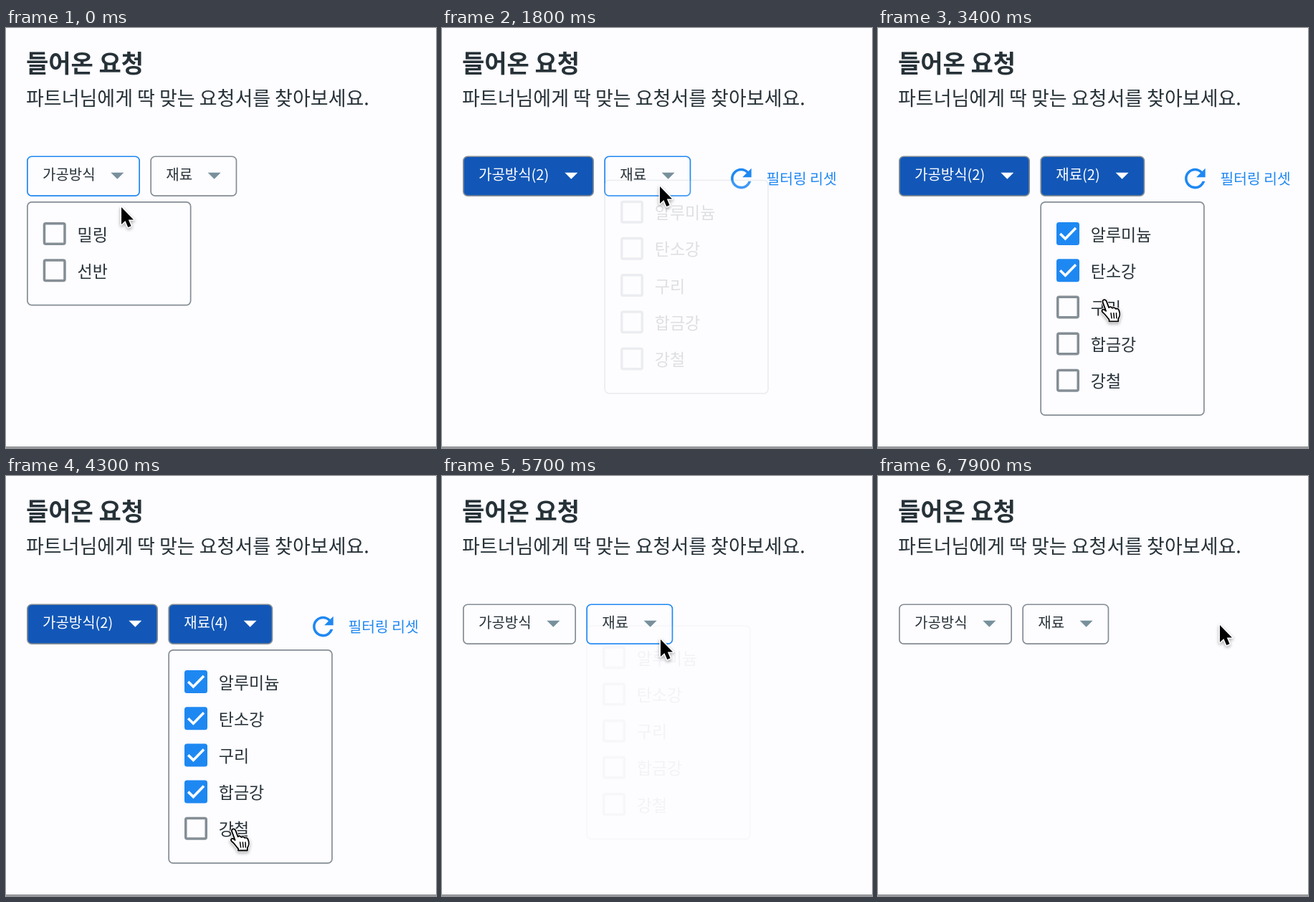
An HTML page with a canvas for the animation above (8 s loop, 600x586 px).

```html
<!DOCTYPE html>
<html lang="ko">
<head>
<meta charset="utf-8">
<title>들어온 요청</title>
<style>
  html, body { margin: 0; width: 100%; height: 100%; overflow: hidden; background: #fdfcff; }
  canvas { display: block; width: 600px; height: 586px; }
</style>
</head>
<body>
<canvas id="stage" lang="ko"></canvas>
<script>
const W = 600, H = 586, LOOP = 8000, STEP = 100;
const FONT = '"Noto Sans CJK KR", "Noto Sans CJK", sans-serif';
const BG = '#fdfcff', INK = '#263238', GREY = '#848e95', CARET = '#78909c';
const BLUE = '#1e88f2', NAVY = [18, 87, 183], PAPER = [253, 252, 255];

const canvas = document.getElementById('stage');
const ctx = canvas.getContext('2d');
const dpr = window.devicePixelRatio || 1;
canvas.width = W * dpr;
canvas.height = H * dpr;

const filters = [
  { label: '가공방식', width: 158, items: ['밀링', '선반'],
    clicks: [500, 1000], reset: 5000,
    open: [[-1000, 1430]] },
  { label: '재료', width: 121, items: ['알루미늄', '탄소강', '구리', '합금강', '강철'],
    clicks: [2740, 3150, 3600, 3980, 4420], reset: 5000,
    again: [6400], againReset: 6900,
    open: [[1728, 5000], [5660, 6900]] }
];

// time, x, y of the pointer tip
const path = [
  [0, 161, 250], [300, 108, 287], [600, 108, 287], [900, 110, 340], [1300, 113, 342],
  [1700, 304, 221], [1800, 304, 221], [2200, 312, 290], [2700, 315, 303], [2800, 315, 303],
  [3100, 316, 345], [3200, 316, 345], [3500, 318, 392], [3600, 318, 392],
  [3900, 319, 445], [4000, 319, 445], [4300, 319, 493], [4500, 319, 493],
  [4900, 488, 212], [5100, 488, 212], [5600, 305, 228], [5700, 305, 228],
  [6200, 290, 290], [6400, 290, 290], [6800, 473, 211], [6900, 473, 211],
  [7200, 477, 208], [8000, 477, 208]
];

const clamp = v => Math.max(0, Math.min(1, v));
const smooth = v => { v = clamp(v); return v * v * (3 - 2 * v); };
const mix = (a, b, p) => `rgb(${a.map((v, i) => Math.round(v + (b[i] - v) * p))})`;
const ramp = (t, from, to) => smooth((t - from) / 300) - smooth((t - to) / 300);

function pointerAt(t) {
  const i = path.findIndex(k => k[0] > t);
  const a = path[i - 1], b = path[i];
  const p = smooth((t - a[0]) / (b[0] - a[0]));
  return { x: a[1] + (b[1] - a[1]) * p, y: a[2] + (b[2] - a[2]) * p };
}

function countAt(f, t) {
  const hits = (list = [], end) => t < end ? list.filter(c => c <= t).length : 0;
  return hits(f.clicks, f.reset) + hits(f.again, f.againReset);
}

function fillAt(f, t) {
  return ramp(t, f.clicks[0], f.reset) + (f.again ? ramp(t, f.again[0], f.againReset) : 0);
}

const openAt = (f, t) => f.open.reduce((sum, [a, b]) => sum + ramp(t, a, b), 0);
const extra = n => n === 0 ? 0 : n === 1 ? 21 : 25;

function text(str, x, y, size, color, weight = 400) {
  ctx.font = `${weight} ${size}px ${FONT}`;
  ctx.fillStyle = color;
  ctx.fillText(str, x, y);
  return x + ctx.measureText(str).width;
}

function box(x, y, w, h, r, fill, stroke, line) {
  ctx.beginPath();
  ctx.roundRect(x + line / 2, y + line / 2, w - line, h - line, r);
  if (fill) { ctx.fillStyle = fill; ctx.fill(); }
  ctx.strokeStyle = stroke;
  ctx.lineWidth = line;
  ctx.stroke();
}

function drawButton(f, x, n, fill, hover) {
  const w = f.width + extra(n);
  const ink = mix([38, 50, 56], [255, 255, 255], fill);
  box(x, 178.4, w, 56.6, 6, mix(PAPER, NAVY, fill), hover && !n ? BLUE : GREY, 1.7);
  let end = text(f.label, x + 22, 212, 20, ink, 500);
  if (n) {
    const tight = n === 1 ? 2 : 0;
    end = text('(', end, 212, 20, ink, 500) - tight;
    end = text(n, end, 212, 20, ink, 500) - tight;
    text(')', end, 212, 20, ink, 500);
  }
  const c = x + w - 31.7;
  ctx.beginPath();
  ctx.moveTo(c - 9, 201.8);
  ctx.lineTo(c + 9, 201.8);
  ctx.lineTo(c, 210.8);
  ctx.fillStyle = n ? '#fff' : CARET;
  ctx.fill();
}

function drawCheck(x, y, on) {
  if (!on) return box(x, y, 32, 32, 2, null, GREY, 3.5);
  ctx.beginPath();
  ctx.roundRect(x, y, 32, 32, 3.5);
  ctx.fillStyle = BLUE;
  ctx.fill();
  ctx.beginPath();
  ctx.moveTo(x + 5.2, y + 16);
  ctx.lineTo(x + 12.4, y + 23);
  ctx.lineTo(x + 27, y + 8);
  ctx.strokeStyle = '#fff';
  ctx.lineWidth = 3.6;
  ctx.stroke();
}

function drawMenu(f, x, n, p) {
  if (p <= 0) return;
  ctx.save();
  ctx.globalAlpha = p;
  ctx.translate(x, 242 - 35.5 * (1 - p));
  box(0, 0, 229.5, 43 + 51.2 * f.items.length, 6, BG, GREY, 1.7);
  f.items.forEach((item, i) => {
    const y = 29 + 51.2 * i;
    drawCheck(22.7, y, i < n);
    text(item, 70.5, y + 25.5, 23, INK);
  });
  ctx.restore();
}

const refresh = new Path2D('M17.65 6.35C16.2 4.9 14.21 4 12 4c-4.42 0-7.99 3.58-7.99 8s3.57 8 7.99 8c3.73 0 6.84-2.55 7.73-6h-2.08c-.82 2.33-3.04 4-5.65 4-3.31 0-6-2.69-6-6s2.69-6 6-6c1.66 0 3.14.69 4.22 1.78L13 11h7V4z');
const arrow = new Path2D('M0 0V24L5.4 19L9.3 28L13.6 26.2L9.8 17.4H17Z');
const hand = new Path2D('M-4 2.6C-4.6-1.4 .2-1.8 1.4 1.6L4.6 10.2Q7.4 8 9.4 11Q12.2 9.2 14.2 12Q17.6 10.8 18.8 14.4C21.2 20 19.6 23 17.8 26V29.5H5V27C2 24 .4 20.4-3 17.8C-6.8 14.8-4.6 11.6-1.4 13.4L.6 15Z');
const creases = new Path2D('M7.6 18L8.6 25M11.4 18L12 25M15 18L15.4 25');

function drawReset(x) {
  ctx.save();
  ctx.translate(x - 7.2, 188.6);
  ctx.scale(1.79, 1.79);
  ctx.fillStyle = BLUE;
  ctx.fill(refresh);
  ctx.restore();
  text('필터링 리셋', x + 49.3, 218, 20.4, BLUE);
}

function drawPointer(x, y, pointing) {
  ctx.save();
  ctx.translate(x, y);
  ctx.lineJoin = ctx.lineCap = 'round';
  ctx.shadowColor = 'rgba(0,0,0,.35)';
  ctx.shadowBlur = 4 * dpr;
  ctx.shadowOffsetY = 2 * dpr;
  ctx.strokeStyle = '#fff';
  ctx.lineWidth = pointing ? 3.4 : 3;
  const shape = pointing ? hand : arrow;
  ctx.stroke(shape);
  ctx.shadowColor = 'transparent';
  ctx.fillStyle = pointing ? '#fff' : '#000';
  ctx.fill(shape);
  if (pointing) {
    ctx.strokeStyle = '#000';
    ctx.lineWidth = 1.8;
    ctx.stroke(hand);
    ctx.lineWidth = 1.5;
    ctx.stroke(creases);
  }
  ctx.restore();
}

function draw(t) {
  ctx.setTransform(dpr, 0, 0, dpr, 0, 0);
  ctx.fillStyle = BG;
  ctx.fillRect(0, 0, W, H);
  ctx.fillStyle = '#77797c';
  ctx.fillRect(0, 584, W, 1.6);
  text('들어온 요청', 28, 62, 34, INK, 700);
  text('파트너님에게 딱 맞는 요청서를 찾아보세요.', 28, 107.5, 27, INK);

  const tip = pointerAt(t);
  let x = 29, total = 0;
  const menus = filters.map(f => {
    const n = countAt(f, t), w = f.width + extra(n);
    const hover = tip.x > x && tip.x < x + w && tip.y > 178 && tip.y < 252;
    drawButton(f, x, n, fillAt(f, t), hover);
    const menu = [f, x, n, openAt(f, t)];
    total += n;
    x += w + 14.3;
    return menu;
  });
  if (total) drawReset(x + 41.5);
  menus.forEach(m => drawMenu(...m));

  const overMenu = tip.y > 262 && tip.x < 455;
  const overReset = total > 0 && tip.x > 400 && tip.y < 235;
  drawPointer(tip.x, tip.y, overMenu || overReset);
}

const start = performance.now();
function tick() {
  const t = (performance.now() - start) % LOOP;
  draw(Math.floor(t / STEP) * STEP);
  requestAnimationFrame(tick);
}
tick();
</script>
</body>
</html>
```
